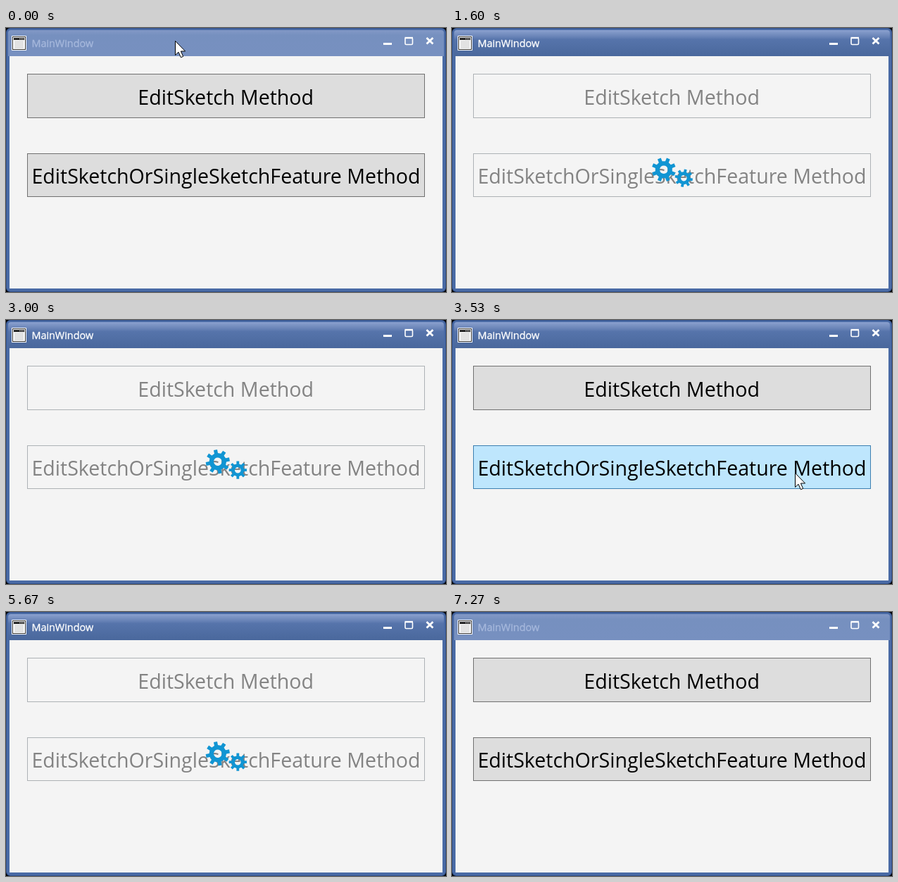
Write an HTML page that moves like this. It is 625x375 px and loops after 7.47 s.

```html
<!DOCTYPE html>
<html lang="en">
<head>
<meta charset="utf-8">
<title>MainWindow</title>
<style>
  html, body { margin: 0; width: 100%; height: 100%; overflow: hidden; background: #000; }
  svg { display: block; width: 625px; height: 375px; }
  text { font-family: "Open Sans", "Noto Sans", sans-serif; }
  .button text { text-anchor: middle; font-size: 28.6px; fill: #000; }
  .button rect { fill: #ddd; stroke: #707070; }
  .button.hover rect { fill: #bee6fd; stroke: #3c7fb1; }
  .button.pressed rect { fill: #c4e5f6; stroke: #2c628b; }
  .button.disabled rect { fill: #f4f4f4; stroke: #adb2b5; }
  .button.disabled text { fill: #838383; }
</style>
</head>
<body>
<svg viewBox="0 0 625 375">
  <defs>
    <linearGradient id="active" x2="0" y2="1">
      <stop offset="0" stop-color="#8ba1cf"/>
      <stop offset=".27" stop-color="#6681b5"/>
      <stop offset=".36" stop-color="#5674ab"/>
      <stop offset="1" stop-color="#4a689c"/>
    </linearGradient>
    <linearGradient id="inactive" x2="0" y2="1">
      <stop offset="0" stop-color="#8298c6"/>
      <stop offset=".2" stop-color="#7690bf"/>
      <stop offset="1" stop-color="#7790c0"/>
    </linearGradient>
  </defs>

  <rect width="625" height="375" fill="#000"/>
  <rect width="625" height="375" rx="6" fill="#31508a"/>
  <rect x="1" y="1" width="623" height="373" rx="5" fill="#4a6ba6"/>
  <path id="bar" d="M3 40V7Q3 3 7 3H618Q622 3 622 7V40Z"/>
  <rect x="5" y="40" width="615" height="330" fill="#f4f4f4"/>

  <g id="icon">
    <rect x="8" y="11" width="21" height="21" fill="#fff"/>
    <rect x="9.5" y="12.5" width="18" height="18" fill="#fff" stroke="#333"/>
    <rect x="11" y="14" width="15" height="3" fill="#222"/>
    <path d="M19 15.5H25" stroke="#ddd" stroke-width="1.2" stroke-dasharray="1.4 .9"/>
    <rect x="12" y="18" width="13" height="11" fill="#e2e2e2"/>
  </g>
  <text id="caption" x="36.4" y="26.5" font-size="14.4" stroke-width=".3">MainWindow</text>
  <g fill="none" stroke="#fff">
    <path d="M536 22.5H548" stroke-width="3"/>
    <rect x="567" y="14" width="10.5" height="9.5" rx="1.5" stroke-width="1.6"/>
    <path d="M566.5 14H578" stroke-width="2.4"/>
    <path d="M597.5 14L606.5 22.5M606.5 14L597.5 22.5" stroke-width="2.8"/>
  </g>

  <g class="button">
    <rect x="30.5" y="65.5" width="564" height="62"/>
    <text x="312.2" y="109">EditSketch Method</text>
  </g>
  <g class="button">
    <rect x="30.5" y="178.5" width="564" height="61"/>
    <text x="312.5" y="221">EditSketchOrSingleSketchFeature Method</text>
  </g>

  <g id="gears" fill="#1195d3" fill-rule="evenodd">
    <path id="big"/>
    <path id="small"/>
  </g>
  <path id="cursor" d="M.5 .5V20.5L5 16.2 8.4 23.8 11.7 22.4 8.4 15H14.6Z" fill="#fff" stroke="#000" stroke-linejoin="round"/>
</svg>
<script>
const LOOP = 7470, FPS = 15, TEETH = 8, SPIN = 11.25;
const $ = id => document.getElementById(id);
const buttons = document.querySelectorAll(".button");

// Steps: [tick, first button, second button, window active]
const steps = [
  [0, "", "", false],
  [14, "pressed", "", true],
  [16, "disabled", "disabled", true],
  [46, "", "", true],
  [53, "", "hover", true],
  [56, "", "pressed", true],
  [63, "disabled", "disabled", true],
  [94, "", "", true],
  [109, "", "", false]
];

// Pointer paths: [tick, x, y]; hidden outside each path's range
const paths = [
  [[0, 240, 18], [3, 242, 32], [6, 248, 74], [9, 254, 110], [10, 255, 114], [12, 256, 111], [16, 256, 111]],
  [[53, 487, 217], [56, 484, 215], [63, 484, 215]],
  [[63, 484, 242], [64, 484, 242]]
];

function gear(root, tip, hole) {
  const at = (r, a) => (r * Math.sin(a)).toFixed(2) + " " + (-r * Math.cos(a)).toFixed(2);
  const pitch = 2 * Math.PI / TEETH, points = [];
  for (let i = 0; i < TEETH; i++) {
    const a = i * pitch;
    points.push(at(root, a - pitch * .27), at(tip, a - pitch * .19),
                at(tip, a + pitch * .19), at(root, a + pitch * .27));
  }
  return `M${points.join("L")}ZM0 ${-hole}A${hole} ${hole} 0 1 0 0 ${hole}A${hole} ${hole} 0 1 0 0 ${-hole}Z`;
}

function pointer(tick) {
  const path = paths.find(p => tick >= p[0][0] && tick < p[p.length - 1][0]);
  if (!path) return null;
  const i = path.findIndex(p => p[0] > tick);
  const [t0, x0, y0] = path[i - 1], [t1, x1, y1] = path[i];
  const k = (tick - t0) / (t1 - t0);
  return [Math.round(x0 + (x1 - x0) * k), Math.round(y0 + (y1 - y0) * k)];
}

function draw(time) {
  const tick = Math.floor(time * FPS / 1000 + .06);
  let [, first, second, active] = steps.filter(s => s[0] <= tick).pop();
  const pos = pointer(tick);
  if (tick < 14 && pos[1] >= 65) first = "hover";

  [first, second].forEach((state, i) => buttons[i].setAttribute("class", "button " + state));
  $("bar").setAttribute("fill", active ? "url(#active)" : "url(#inactive)");
  const ink = active ? "#fff" : "#a6b8dc";
  $("caption").setAttribute("fill", ink);
  $("caption").setAttribute("stroke", ink);

  $("gears").style.display = first === "disabled" ? "" : "none";
  const turn = (tick - 38) * SPIN;
  $("big").setAttribute("transform", `translate(300.8 201.2) rotate(${turn})`);
  $("small").setAttribute("transform", `translate(329.3 213.2) rotate(${-SPIN - turn})`);

  $("cursor").style.display = pos ? "" : "none";
  if (pos) $("cursor").setAttribute("transform", `translate(${pos})`);
}

$("big").setAttribute("d", gear(12.2, 17.2, 5.8));
$("small").setAttribute("d", gear(9, 12.8, 4.3));

const start = performance.now();
function play() {
  draw((performance.now() - start) % LOOP);
  requestAnimationFrame(play);
}
play();
</script>
</body>
</html>
```
